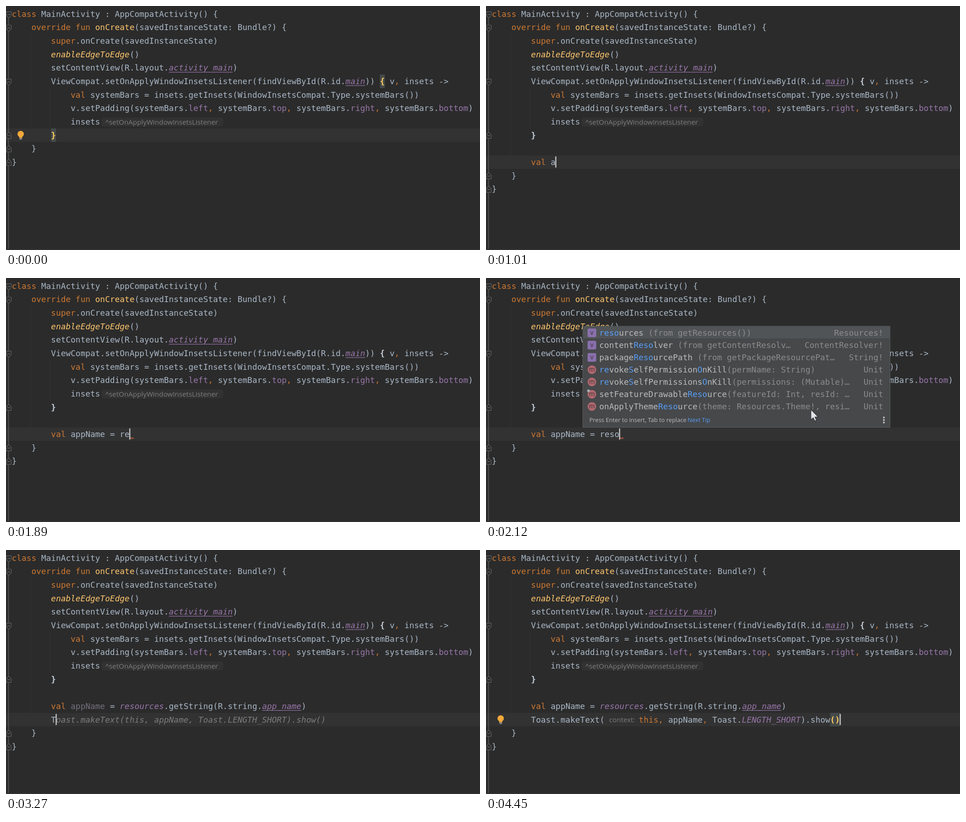
These frames come from a looping animation (1043x537 px, 4570 ms). An HTML page with a canvas:

```html
<!DOCTYPE html>
<html lang="en">
<head>
<meta charset="utf-8">
<title>Code editor</title>
<style>
  html, body { margin: 0; width: 100%; height: 100%; overflow: hidden; background: #2b2b2b; }
  canvas { display: block; }
</style>
</head>
<body>
<canvas id="stage" width="1043" height="537"></canvas>
<script>
const ctx = document.getElementById('stage').getContext('2d');
const LOOP = 4570, LEFT = 12.7, CELL = 10.8, PITCH = 29.65;
const MONO = '17.94px "DejaVu Sans Mono", monospace';
const SANS = '"Open Sans", sans-serif';
const BACK = '#2b2b2b', PLAIN = '#a9b7c6', PURPLE = '#9876aa', GOLD = '#ffc66d';

const STYLES = {
  n: { color: PLAIN },
  k: { color: '#cc7832' },
  f: { color: GOLD },
  F: { color: GOLD, italic: true },
  p: { color: PURPLE },
  P: { color: PURPLE, italic: true },
  U: { color: PURPLE, italic: true, underline: true },
  b: { color: '#c3ccd6', bold: true },
  y: { color: '#ffcf5c', bold: true },
  g: { color: '#7c7c7c', italic: true },
  u: { color: '#746f7e' },
  w: { color: '#bbbbbb' },
  m: { color: '#589df6' },
  d: { color: '#8c8c8c' }
};

// Between § signs, the first letter picks the style of the rest.
const CODE = [
  [0, '§kclass§ MainActivity : AppCompatActivity() {'],
  [4, '§koverride fun§ §fonCreate§(savedInstanceState: Bundle?) {'],
  [8, '§ksuper§.onCreate(savedInstanceState)'],
  [8, '§FenableEdgeToEdge§()'],
  [8, 'setContentView(R.layout.§Uactivity_main§)'],
  [8, 'ViewCompat.setOnApplyWindowInsetsListener(findViewById(R.id.§Umain§)) §b{§ v§k,§ insets ->'],
  [12, '§kval§ systemBars = insets.getInsets(WindowInsetsCompat.Type.systemBars())'],
  [12, 'v.setPadding(systemBars.§pleft§k,§ systemBars.§ptop§k,§ systemBars.§pright§k,§ systemBars.§pbottom§)'
    .replace(/§k,§/g, '§§k,§')],
  [12, 'insets'],
  [8, '§b}§']
];

const COMPLETIONS = [
  ['v', '§mreso§urces§d (from getResources())§', 'Resources!'],
  ['v', 'content§mReso§lver§d (from getContentResolv…§', 'ContentResolver!'],
  ['v', 'package§mReso§urcePath§d (from getPackageResourcePat…§', 'String!'],
  ['m', '§mre§voke§mS§elfPermission§mO§nKill§d(permName: String)§', 'Unit'],
  ['m', '§mre§voke§mS§elfPermissions§mO§nKill§d(permissions: (Mutable)…§', 'Unit'],
  ['m', 'setFeatureDrawable§mReso§urce§d(featureId: Int, resId: …§', 'Unit'],
  ['m', 'onApplyTheme§mReso§urce§d(theme: Resources.Theme!, resi…§', 'Unit']
];

const TYPED = 'val appName = reso';
const KEYS = [760, 810, 860, 930, 1000, 1070, 1140, 1210, 1330, 1400, 1460, 1520, 1560, 1600, 1780, 1850, 1950, 2030];
const ENTER = [300, 500, 2830];
const TIME = { ghost: 2310, accept: 2620, letter: 3150, ghost2: 3230, accept2: 3620, match: 3700, inlay: 3800, bulb: 4150 };

const within = (t, from, to) => t >= from && t < to;
const passed = (times, t) => times.filter(at => t >= at).length;
const rowY = row => 17.4 + PITCH * row;
const colX = col => LEFT + CELL * col;

function rect(x, y, w, h, color) {
  ctx.fillStyle = color;
  ctx.fillRect(x, y, w, h);
}

function roundBox(x, y, w, h, r, color) {
  ctx.fillStyle = color;
  ctx.beginPath();
  ctx.roundRect(x, y, w, h, r);
  ctx.fill();
}

function disc(x, y, r, color) {
  ctx.fillStyle = color;
  ctx.beginPath();
  ctx.arc(x, y, r, 0, 7);
  ctx.fill();
}

function polygon(points, fill, stroke) {
  ctx.beginPath();
  points.forEach(([x, y]) => ctx.lineTo(x, y));
  ctx.closePath();
  ctx.fillStyle = fill;
  ctx.fill();
  ctx.strokeStyle = stroke;
  ctx.lineWidth = 1.2;
  ctx.stroke();
}

function label(text, x, y, size, color, align = 'left') {
  ctx.font = `${size}px ${SANS}`;
  ctx.fillStyle = color;
  ctx.textAlign = align;
  ctx.fillText(text, x, y);
  ctx.textAlign = 'left';
}

// Draws marked-up monospaced text centred on y.
function rich(x, y, markup, base = 'n') {
  markup.split('§').forEach((part, i) => {
    if (!part) return;
    const style = STYLES[i % 2 ? part[0] : base];
    const text = i % 2 ? part.slice(1) : part;
    ctx.font = `${style.italic ? 'italic ' : ''}${style.bold ? 'bold ' : ''}${MONO}`;
    ctx.fillStyle = style.color;
    ctx.fillText(text, x, y + 6.3);
    if (style.underline) ctx.fillRect(x, y + 9, text.length * CELL, 1.2);
    x += text.length * CELL;
  });
}

const code = (row, col, markup) => rich(colX(col), rowY(row), markup);

function cellBox(row, x, cells, color) {
  rect(x, rowY(row) - 14.8, cells * CELL, PITCH, color);
}

function foldMark(row, opens) {
  const y = rowY(row) + 1.2, s = opens ? 1 : -1;
  polygon([[0.5, y - 6 * s], [11.5, y - 6 * s], [11.5, y + 2 * s], [6, y + 7.5 * s], [0.5, y + 2 * s]], BACK, '#606366');
  rect(3, y - 0.6, 6, 1.2, '#77797b');
}

function bulb(row) {
  const y = rowY(row);
  disc(32.3, y - 2.5, 7, '#f2a93b');
  rect(29, y + 2, 6.6, 4, '#f2a93b');
  rect(29, y + 6.5, 6.6, 1.2, '#b4b4b4');
  rect(30, y + 8.6, 4.6, 1.2, '#b4b4b4');
}

function squiggle(x, y) {
  ctx.strokeStyle = '#bc5f3c';
  ctx.lineWidth = 1.2;
  ctx.beginPath();
  for (let i = 0; i < 5; i++) ctx.lineTo(x + i * 2, y + (i % 2 ? -1.5 : 1.5));
  ctx.stroke();
}

function pointer() {
  polygon([[715, 289.5], [715, 312], [720, 307.5], [723.5, 314.5], [727, 313], [723.8, 306], [730.5, 305.5]], '#e4e4e8', '#34343c');
}

function popup(x, y, height, tip, linkX) {
  rect(x, y, 677, height, '#5c5f61');
  rect(x + 1, y + 1, 675, height - 2, '#46484a');
  rect(x + 1, y + 1, 675, 26.5, '#505456');
  label(tip, x + 15, 317.3, 13, '#bbbbbb');
  label('Next Tip', linkX, 317.3, 13, '#589df6');
  [307, 312.5, 318].forEach(dotY => disc(x + 663, dotY, 2, '#c4c4c4'));
}

function loadingPopup(t) {
  popup(137, 267, 62, 'Ctrl+Down and Ctrl+Up will move caret down and up in the editor', 552);
  const lead = Math.floor(t / 100);
  for (let i = 0; i < 8; i++) {
    const a = i * Math.PI / 4;
    ctx.strokeStyle = `rgba(150,160,170,${0.15 + (i + 8 - lead % 8) % 8 * 0.06})`;
    ctx.lineWidth = 2;
    ctx.beginPath();
    ctx.moveTo(775 + 4 * Math.cos(a), 312.5 + 4 * Math.sin(a));
    ctx.lineTo(775 + 8 * Math.cos(a), 312.5 + 8 * Math.sin(a));
    ctx.stroke();
  }
  pointer();
}

function completionPopup() {
  popup(212.5, 105.5, 223.5, 'Press Enter to insert, Tab to replace', 443.5);
  COMPLETIONS.forEach(([kind, markup, type], i) => {
    const y = 120.8 + 27 * i;
    if (kind === 'v') roundBox(223.5, y - 9.5, 19, 19, 3, '#8a70ad');
    else disc(233, y, 9.5, '#b0686f');
    label(kind, 233, y + 4.5, 14, '#3a3034', 'center');
    if (i === 5) disc(225.5, y - 7.5, 3, '#a8adb0');
    rich(249.3, y, markup, 'w');
    rich(874 - type.length * CELL, y, type, 'd');
  });
  pointer();
}

function hint(text, x, row, width) {
  roundBox(x, rowY(row) - 9, width, 19.5, 5, '#323233');
  label(text, x + 8.5, rowY(row) + 6, 15.3, '#7d7d7d');
}

function firstStatement(t) {
  if (t >= TIME.accept) {
    const name = within(t, TIME.accept, TIME.accept2) ? '§uappName§' : 'appName';
    code(11, 8, `§kval§ ${name} = §Presources§.getString(R.string.§Uapp_name§)`);
    return 60;
  }
  const count = passed(KEYS, t), text = TYPED.slice(0, count);
  if (within(t, 1180, 1480)) cellBox(11, colX(12), Math.min(count, 11) - 4, '#4a2c2e');
  code(11, 8, text.replace(/^val/, '§kval§'));
  let end = 8 + count;
  if (t >= TIME.ghost) {
    code(11, end, '§gurces.getString(R.string.app_name)§');
    end += 34;
  }
  if (count > 12) squiggle(colX(end) + 1, rowY(11) + 9);
  return 8 + count;
}

function secondStatement(t) {
  if (t < TIME.letter) return colX(8);
  if (t < TIME.accept2) {
    code(12, 8, 'T' + (t >= TIME.ghost2 ? '§goast.makeText(this, appName, Toast.LENGTH_SHORT).show()§' : ''));
    return colX(9);
  }
  const inlay = t >= TIME.inlay, matched = t >= TIME.match;
  const x = colX(23) + (inlay ? 75 : 0), y = rowY(12);
  code(12, 8, 'Toast.makeText(');
  if (inlay) hint('context:', 262.5, 12, 70);
  if (matched) cellBox(12, x + 39 * CELL, 2, '#454a4a');
  rich(x, y, `§kthis,§ appName§k,§ Toast.§PLENGTH_SHORT§).show${matched ? '§y()§' : '()'}`);
  return x + 41 * CELL;
}

function draw(t) {
  const added = passed(ENTER, t), current = 9 + added;
  rect(0, 0, 1043, 537, BACK);
  rect(0, rowY(current) - 14.8, 1043, PITCH, '#323232');
  rect(0, 535.5, 1043, 1.5, '#383838');

  rect(54, 62, 1, rowY(current) - 77, '#333333');
  rect(97, 180, 1, 90, '#333333');
  rect(4.8, 24, 1.5, 510, '#595b5d');
  [0, 1, 5].forEach(row => foldMark(row, true));
  [9, 10 + added, 11 + added].forEach(row => foldMark(row, false));

  const braces = added === 0;
  if (braces) {
    cellBox(5, colX(75), 1, '#454a4a');
    cellBox(9, colX(8), 1, '#454a4a');
  }
  CODE.forEach(([col, markup], row) =>
    code(row, col, braces ? markup.replace(/§b([{}])/, '§y$1') : markup));
  hint('^setOnApplyWindowInsetsListener', 210, 8, 268);
  code(10 + added, 4, '}');
  code(11 + added, 0, '}');

  let caretX = colX(braces ? 9 : 8);
  if (added >= 2) caretX = colX(firstStatement(t));
  if (added === 3) caretX = secondStatement(t);

  const caretHidden = t < 140 || within(t, 2530, TIME.accept) || within(t, 4190, 4450);
  if (!caretHidden) rect(caretX - 0.7, rowY(current) - 12.5, 2.4, 24.5, '#c8c8c8');
  if (braces || t >= TIME.bulb) bulb(current);

  if (within(t, 1040, 1480)) loadingPopup(t);
  if (within(t, 2100, TIME.accept)) completionPopup();
}

function tick() {
  draw(performance.now() % LOOP);
  requestAnimationFrame(tick);
}
tick();
</script>
</body>
</html>
```
